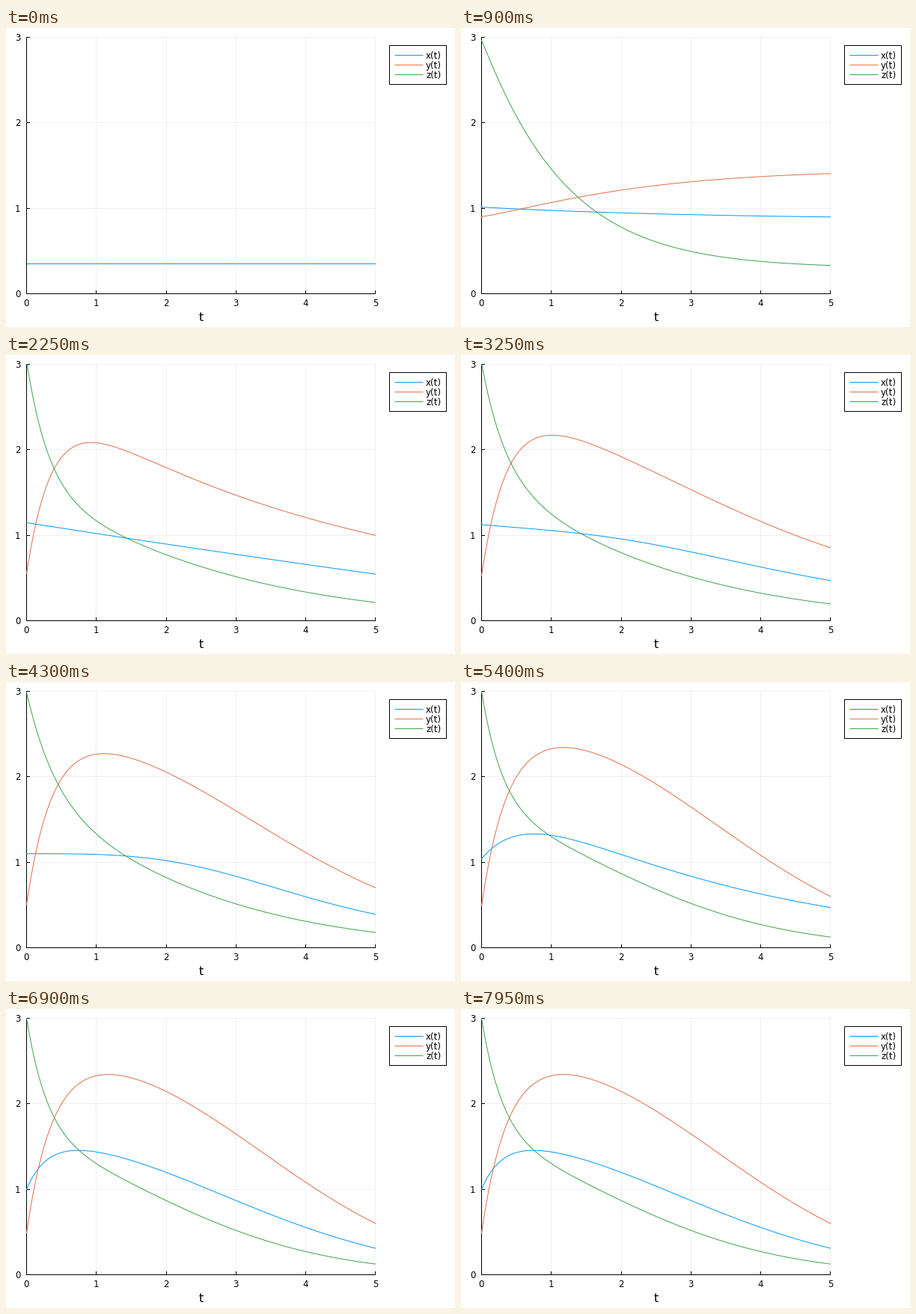
A matplotlib script that plays this animation: 600 by 400 pixels, repeating every 8 s.

```python
import numpy as np
import matplotlib.pyplot as plt
from matplotlib.animation import FuncAnimation
from matplotlib.patches import Rectangle

W, H, DPI = 600, 400, 100
FRAMES, INTERVAL = 160, 50
LEFT, RIGHT, TOP, BOTTOM = 27, 493.4, 12, 355
BLUE, RED, GREEN = "#009AFA", "#E36F47", "#3EA44E"

t = np.linspace(0, 5, 301)


def hump(height, width, power, start, rate):
    """Slow bell-shaped fall plus a quick exponential start."""
    return height * np.exp(-(t / width) ** power) + start * np.exp(-rate * t)


def flat(value):
    return np.full_like(t, value)


# Fitted shape of each curve at a few training steps
x_path = {
    0: flat(.353),
    18: flat(.865) + .148 * np.exp(-.3 * t),
    45: 1.147 - .128 * t + .0015 * t ** 2,
    86: 1.1 / (1 + (t / 4.2) ** 3.42),
    108: hump(2.03, 3.42, 1, -.99, 1.6),
    138: hump(1.55, 3.94, 2, -.55, 3.5),
}
y_path = {
    0: flat(-.2),
    18: flat(1.45) - .547 * np.exp(-(t / 2.325) ** 1.214),
    45: hump(2.9, 4.65, .88, -2.345, 2.7),
    100: hump(2.55, 4.27, 2.345, -2.06, 2.7),
}
z_path = {
    0: flat(-.3),
    18: flat(.3) + 2.665 * np.exp(-(t / 1.19) ** 1.04),
    45: hump(1.46, 2.9, 1.2, 1.58, 3.2),
    86: hump(1.56, 2.76, 1.3, 1.425, 2.35),
    108: hump(1.45, 2.95, 1.7, 1.55, 3.2),
}


def px(v):
    return LEFT + (RIGHT - LEFT) * v / 5


def py(v):
    return BOTTOM - (BOTTOM - TOP) * v / 3


def blend(path, step):
    """Curve at a training step; the first stretch eases out."""
    steps = list(path)
    if step >= steps[-1]:
        return path[steps[-1]]
    a, b = next(p for p in zip(steps, steps[1:]) if step < p[1])
    u = (step - a) / (b - a)
    if a == 0:
        u = 1 - (1 - u) ** 2
    return path[a] + (path[b] - path[a]) * u


plt.rcParams["font.family"] = "DejaVu Sans"
fig = plt.figure(figsize=(W / DPI, H / DPI), dpi=DPI, facecolor="white")
ax = fig.add_axes([0, 0, 1, 1])
ax.set(xlim=(0, W), ylim=(H, 0))
ax.axis("off")


def line(xs, ys, color="black", **kw):
    return ax.plot(xs, ys, color=color, lw=72 / DPI, **kw)[0]


def label(x, y, s, size=11.7, ha="center"):
    ax.text(x, y, s, fontsize=size * 72 / DPI, ha=ha, va="baseline")


# Straight lines sit on whole pixels; the renderer centres them
for n in range(6):
    x = px(n)
    line([x, x], [TOP, BOTTOM], alpha=.06, zorder=1)
    line([x, x], [BOTTOM, BOTTOM - 4], zorder=3)
    label(x, 372.2, str(n))
for n in range(4):
    y = py(n)
    line([LEFT, RIGHT], [y, y], alpha=.06, zorder=1)
    line([LEFT, LEFT + 4], [y, y], zorder=3)
    label(19.5, y + 4.9, str(n), ha="right")
line([LEFT, LEFT], [TOP, BOTTOM], zorder=3)
line([LEFT, RIGHT], [BOTTOM, BOTTOM], zorder=3)
label(260.8, 392, "t", size=16.1)

ax.add_patch(Rectangle((512, 23), 76, 52, fc="white", ec="black", lw=72 / DPI))
area = Rectangle((LEFT, TOP), RIGHT - LEFT + .6, BOTTOM - TOP + 1,
                 transform=ax.transData)
curves = []
for k, (name, color) in enumerate(zip("xyz", (BLUE, RED, GREEN))):
    y = 36 + 13 * k
    line([518.5, 556.5], [y, y], color, solid_capstyle="butt")
    label(561, y + 4.6, f"{name}(t)", ha="left")
    curve = line([], [], color, zorder=4)
    curve.set_clip_path(area)
    curves.append(curve)


def draw(step):
    for curve, path in zip(curves, (x_path, y_path, z_path)):
        curve.set_data(px(t) + .5, py(blend(path, step)) + .5)
    return curves


anim = FuncAnimation(fig, draw, frames=FRAMES, interval=INTERVAL,
                     repeat=True, repeat_delay=0)
plt.show()
```
